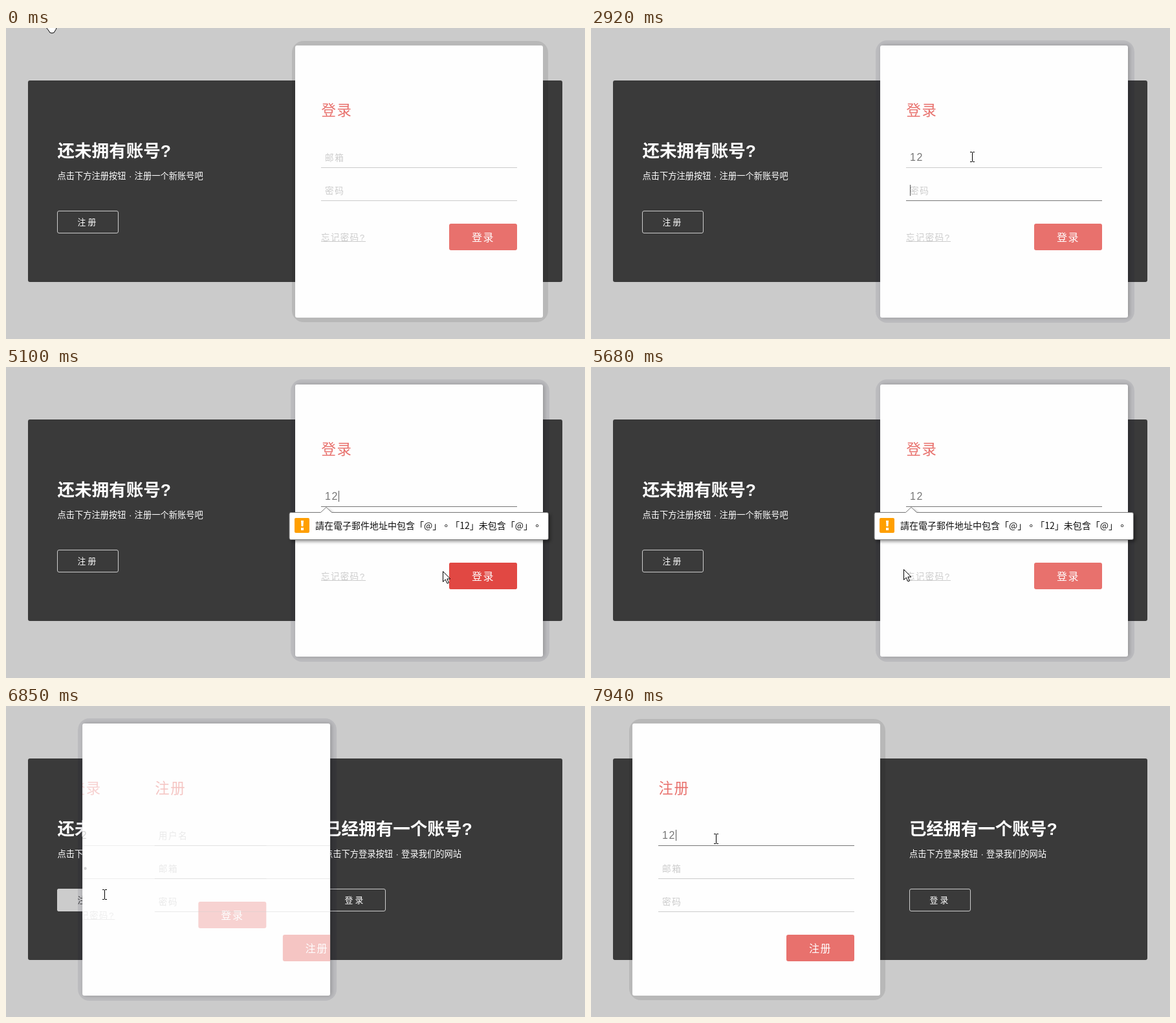
These frames come from a looping animation (895 by 480 pixels, 8000 ms). An HTML page:

```html
<!DOCTYPE html>
<html lang="zh-Hans">
<head>
<meta charset="utf-8">
<title>登录 / 注册</title>
<style>
html, body { margin: 0; width: 100%; height: 100%; overflow: hidden; background: #cbcbcb; }
svg { display: block; width: 895px; height: 480px; font-family: "Liberation Sans", "Noto Sans CJK SC", "Noto Sans CJK", sans-serif; }
.heading { font-size: 26.56px; font-weight: 700; fill: #fff; }
.note { font-size: 13.28px; fill: #fff; word-spacing: .6px; }
.outline { fill: none; stroke: #ccc; }
.small { font-size: 12.8px; letter-spacing: 3.2px; fill: #fff; }
.title { font-size: 22.4px; font-weight: 300; letter-spacing: 1.6px; fill: #e8716d; }
.label { font-size: 13.6px; font-weight: 300; letter-spacing: 1.6px; fill: #ccc; }
.value { font-size: 16px; letter-spacing: 1.6px; fill: #777; }
.forgot { font-size: 13.33px; font-weight: 300; letter-spacing: 1.6px; fill: #ccc; }
.submit { font-size: 16px; font-weight: 300; letter-spacing: 1.6px; fill: #fff; }
.tip { font: 14px "Noto Sans CJK TC", "Noto Sans CJK SC", "Noto Sans CJK", sans-serif; text-spacing-trim: space-all; fill: #111; }
.bubble { fill: #fff; stroke: #777; filter: drop-shadow(3px 3px 2px rgba(0,0,0,.35)); }
.pointer { fill: #fff; stroke: #000; stroke-linejoin: round; }
.soft { filter: drop-shadow(2px 0 3px rgba(0,0,0,.22)); }
</style>
</head>
<body>
<svg viewBox="0 0 895 480">
  <defs><clipPath id="cardClip"><rect y="27" width="383" height="420" rx="3"/></clipPath></defs>
  <rect width="895" height="480" fill="#cbcbcb"/>
  <rect x="34" y="81" width="826" height="311" rx="3" fill="#3a3a3a"/>

  <text class="heading" x="79.5" y="199">还未拥有账号?</text>
  <text class="note" x="79.5" y="233">点击下方注册按钮 · 注册一个新账号吧</text>
  <rect id="openHover" x="79" y="282" width="95" height="35" rx="3" fill="#ccc"/>
  <rect class="outline" x="79.5" y="282.5" width="94" height="34" rx="2.5"/>
  <text id="openText" class="small" x="110.5" y="304">注册</text>

  <text class="heading" x="492" y="199">已经拥有一个账号?</text>
  <text class="note" x="492" y="233">点击下方登录按钮 · 登录我们的网站</text>
  <rect class="outline" x="492.5" y="282.5" width="94" height="34" rx="2.5"/>
  <text class="small" x="523.5" y="304">登录</text>

  <g id="card">
    <rect id="plateFlat" x="-5" y="20" width="396" height="434" rx="18" fill="rgba(0,0,0,.095)"/>
    <rect id="plateSoft" x="-7" y="19" width="400" height="436" rx="18" fill="rgba(20,20,60,.08)"/>
    <rect id="sheet" y="27" width="383" height="420" rx="3" fill="#fefefe"/>
    <g clip-path="url(#cardClip)">
      <g id="login">
        <text class="title" x="40.5" y="135">登录</text>
        <text class="forgot" x="40" y="328">忘记密码?</text>
        <rect x="40" y="329" width="69" height="1" fill="#ccc"/>
        <rect x="238" y="302" width="105" height="41" rx="3" fill="#e8716d"/>
        <rect id="loginHover" x="238" y="302" width="105" height="41" rx="3" fill="#e14641"/>
        <text class="submit" x="273" y="328.5">登录</text>
      </g>
      <g id="signup">
        <text class="title" x="40.5" y="135">注册</text>
        <rect x="238" y="353" width="105" height="41" rx="3" fill="#e8716d"/>
        <text class="submit" x="273" y="379.5">注册</text>
      </g>
    </g>
  </g>

  <g id="tooltip">
    <path class="bubble" d="M440.5 224.5H486.500l8.500-8 8.500 8H836q2.500 0 2.500 2.500V264q0 2.500-2.500 2.500H440.500q-2.500 0-2.500-2.500V227q0-2.500 2.500-2.500z"/>
    <rect x="446" y="233" width="23" height="23" rx="2" fill="#ff9f00"/>
    <path d="M456 237h4l-.6 9h-2.800zM456 248h4v4h-4z" fill="#fff"/>
    <text class="tip" lang="zh-Hant" x="478" y="249.500">請在電子郵件地址中包含「@」。「12」未包含「@」。</text>
  </g>

  <g id="cursor">
    <path id="arrow" class="pointer" d="M.5.5v16l3.700-3.500 2.800 6 2.500-1-2.700-6h5z"/>
    <path id="hand" class="pointer" d="M-2 2q2-3 4 0v7l1-1 3 1 1 1h2q2 0 3 2v4q0 3-2 5-1 4-5 4-4 0-5-4l-4-5-3-5q1-2 3-1l2 2zM2 9v5M5 9v5M8 10v4"/>
    <path id="beam" d="M-3-7.500h3m1 0h3M.5-7V7M-3 7.500h3m1 0h3" fill="none" stroke="#000"/>
  </g>
</svg>
<script>
const $ = id => document.getElementById(id);
const set = (el, name, value) => el.setAttribute(name, value);
const show = (el, on) => set(el, 'visibility', on ? 'inherit' : 'hidden');
const clamp = v => Math.min(1, Math.max(0, v));
const within = (t, spans) => spans.some(([a, b]) => t >= a && t < b);

function bezier(x1, y1, x2, y2) {
  const at = (a, b, s) => 3 * a * s * (1 - s) ** 2 + 3 * b * s * s * (1 - s) + s ** 3;
  return p => {
    let lo = 0, hi = 1;
    for (let i = 0; i < 20; i++) {
      const mid = (lo + hi) / 2;
      if (at(x1, x2, mid) < p) lo = mid; else hi = mid;
    }
    return at(y1, y2, hi);
  };
}
const ease = bezier(.25, .1, .25, 1);
const easeInOut = bezier(.42, 0, .58, 1);
const ramp = (t, start, length, curve = easeInOut) => curve(clamp((t - start) / length));
const pulse = (t, a, b) => ramp(t, a, 200) - ramp(t, b, 200);

// typed: [time, text] pairs; focus and caret: [start, end] spans
function addField(form, y, label, { typed = [], focus = [], caret = [], step = 10.5 } = {}) {
  const group = document.createElementNS('http://www.w3.org/2000/svg', 'g');
  group.innerHTML = `<rect x="40" y="${y}" width="303" height="1" fill="#ccc"/>
    <rect x="40" y="${y}" width="303" height="1" fill="#777"/>
    <text class="label" x="46" y="${y - 10.5}">${label}</text>
    <text class="value" x="46" y="${y - 10}"></text>
    <rect y="${y - 24}" width="1" height="17" fill="#555"/>`;
  $(form).append(group);
  const [, focusLine, hint, value, bar] = group.children;
  return t => {
    const text = typed.reduce((last, [at, s]) => t >= at ? s : last, '');
    value.textContent = text;
    show(hint, !text);
    set(focusLine, 'opacity', focus.reduce((sum, [a, b]) => sum + pulse(t, a, b), 0));
    show(bar, within(t, caret));
    set(bar, 'x', 46 + text.length * step);
  };
}

const fields = [
  addField('login', 215, '邮箱', {
    typed: [[2080, '1'], [2250, '12']],
    focus: [[900, 2600], [4800, 6400]],
    caret: [[910, 1400], [1990, 2660], [4840, 5340], [5840, 6340]]
  }),
  addField('login', 266, '密码', {
    typed: [[3080, '•'], [3160, '••'], [3330, '•••']],
    focus: [[2600, 4800]],
    caret: [[2660, 3840], [4330, 4590]],
    step: 7.1
  }),
  addField('signup', 215, '用户名', {
    typed: [[7845, '1'], [7925, '12']],
    focus: [[7450, 8300]],
    caret: [[7500, 8000]]
  }),
  addField('signup', 266, '邮箱'),
  addField('signup', 317, '密码')
];

const path = [
  [80, 66, -17], [830, 632, 198], [920, 630, 199], [1090, 589, 199], [3430, 589, 199],
  [4180, 719, 311], [4340, 729, 316], [4930, 729, 316], [5680, 482, 312],
  [6350, 144, 311], [6770, 144, 311], [7020, 170, 246], [7270, 193, 205]
];
const shapes = {
  hand: [[0, 75], [4120, 5060], [5456, 5660], [6290, 6760]],
  beam: [[800, 3880], [6760, 8100]]
};

function drawCursor(t) {
  let [, x, y] = path[0];
  path.slice(1).forEach(([end, nx, ny], i) => {
    const start = path[i][0], p = clamp((t - start) / (end - start));
    x += (nx - path[i][1]) * p;
    y += (ny - path[i][2]) * p;
  });
  set($('cursor'), 'transform', `translate(${Math.round(x)} ${Math.round(y)})`);
  const hand = within(t, shapes.hand), beam = within(t, shapes.beam);
  show($('hand'), hand);
  show($('beam'), beam);
  show($('arrow'), !hand && !beam);
}

const SLIDE = 6600;
function draw(t) {
  // the card bounces 30px past its resting place, then settles
  const offset = 383 - 413 * ramp(t, SLIDE, 500, ease) + 30 * ramp(t, SLIDE + 500, 500, ease);
  set($('card'), 'transform', `translate(${64 + offset} 0)`);
  const soft = within(t, [[2660, 6900]]);
  show($('plateSoft'), soft);
  show($('plateFlat'), !soft);
  set($('sheet'), 'class', soft ? 'soft' : '');

  set($('login'), 'transform', `translate(${-120 * ramp(t, SLIDE, 500)} 0)`);
  set($('login'), 'opacity', 1 - ramp(t, SLIDE, 400));
  const shown = ramp(t, SLIDE, 1000, ease);
  set($('signup'), 'transform', `translate(${120 * (1 - shown)} 0)`);
  set($('signup'), 'opacity', shown);

  set($('loginHover'), 'opacity', pulse(t, 4000, 5060));
  const open = pulse(t, 6200, 7000);
  set($('openHover'), 'opacity', open);
  set($('openText'), 'style', `fill:${open > .5 ? '#3a3a3a' : '#fff'}`);
  show($('tooltip'), within(t, [[4840, 6425]]));
  fields.forEach(update => update(t));
  drawCursor(t);
}

const TICK = 83.5, LOOP = 8000;
function loop() {
  draw(Math.floor((performance.now() % LOOP + 6) / TICK) * TICK);
  requestAnimationFrame(loop);
}
loop();
</script>
</body>
</html>
```
